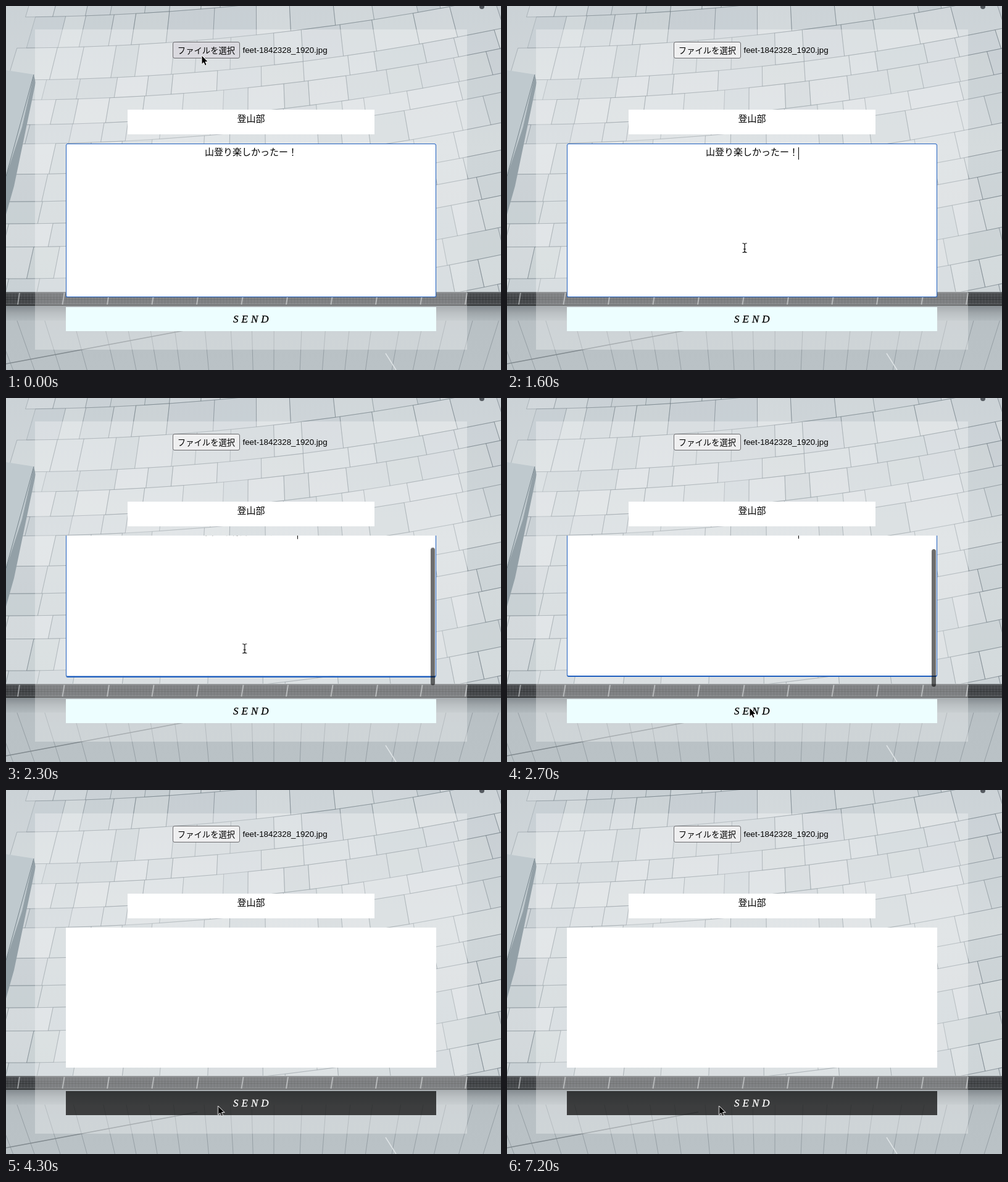
An HTML page with a canvas that plays this animation: 802 by 590 pixels, repeating every 7.3 s.

```html
<!DOCTYPE html>
<html lang="ja">
<head>
<meta charset="utf-8">
<title>Post form</title>
<style>
  html, body { margin: 0; width: 100%; height: 100%; overflow: hidden; }
  body { position: relative; color: #000; font: 15px/22px "Noto Sans CJK JP", "Noto Sans CJK", sans-serif; }
  body *, body *::before { box-sizing: border-box; }
  .abs, #stage > * { position: absolute; white-space: nowrap; }
  #stage { position: absolute; inset: 0; width: 802px; height: 590px; overflow: hidden; background: #cbd2d6; }
  .anim { animation: 7.3s linear infinite; }

  .panel { left: 47px; top: 38px; width: 700px; height: 519px; background: rgba(255, 255, 255, .3); }
  .file { left: 270px; top: 58px; width: 109px; height: 27px; border: 1px solid #6b6b6e; border-radius: 3px;
    background: #efeff0; font-size: 13.333px; line-height: 25px; text-align: center; animation-name: file; }
  .name { left: 383.5px; top: 61px; font: 13.333px/21px "Liberation Sans", Arial, sans-serif; }
  .title { left: 197px; top: 168px; width: 400px; height: 40px; background: #fff; line-height: 27px; text-align: center; }

  .view { left: 97px; top: 223px; width: 600px; height: 249px; overflow: hidden; }
  .page { left: 0; top: 0; width: 600px; height: 250px; animation-name: scroll; }
  .paper { inset: 0 0 2px; background: #fff; }
  .ring { inset: 0; border: 1px solid #1f5fbf; border-bottom-width: 2px; border-radius: 3px; animation-name: ring; }
  .text { left: 0; top: 2px; width: 100%; text-align: center; }
  .caret { left: 375px; top: 6px; width: 1px; height: 20px; background: #000; animation-name: caret; }
  .thumb { left: 591px; top: 2px; width: 7px; height: 223px; border-radius: 4px; background: #000; opacity: 0; animation-name: thumb; }

  .send { left: 97px; top: 488px; width: 600px; height: 39px; animation-name: send; }
  .send span { left: 271px; top: 0; font: italic 17px/39px "Liberation Serif", "Times New Roman", serif; letter-spacing: 5px; -webkit-text-stroke: .3px; }

  .cursor { left: 0; top: 0; width: 0; height: 0; animation-name: move; }
  .cursor svg { position: absolute; overflow: visible; width: 1px; height: 1px; }
  .arrow { animation-name: arrow; }
  .beam { animation-name: beam; }
  .arrow, .beam, .caret, .ring, .file { animation-timing-function: step-end; }

  @keyframes file { 0% { background: #dad9df; } 9.5%, 100% { background: #efeff0; } }
  @keyframes scroll {
    0%, 26.4% { transform: translateY(0); }
    27.4% { transform: translateY(-3px); animation-timing-function: ease-out; }
    32.2%, 100% { transform: translateY(-21px); }
  }
  @keyframes ring { 0% { opacity: 1; } 54.8%, 100% { opacity: 0; } }
  @keyframes caret {
    0%, 10.96%, 24.66%, 38.36%, 52.05%, 100% { opacity: 0; }
    4.11%, 17.81%, 31.51%, 45.1% { opacity: 1; }
  }
  @keyframes thumb {
    0%, 27.5% { opacity: 0; transform: translateY(3px); }
    28.3% { opacity: .57; transform: translateY(6px); }
    32.2%, 43.9% { opacity: .57; transform: translateY(20px); }
    45.2% { opacity: .4; transform: translateY(20px); }
    48%, 100% { opacity: 0; transform: translateY(20px); }
  }
  @keyframes send {
    0%, 37% { background: #edfeff; color: #000; animation-timing-function: ease; }
    47%, 100% { background: rgba(0, 0, 0, .71); color: #fff; }
  }
  @keyframes move {
    0%, 8.2% { transform: translate(317px, 80px); animation-timing-function: ease-in; }
    13.7% { transform: translate(331px, 171px); animation-timing-function: ease-out; }
    21.9% { transform: translate(385px, 392px); }
    27.4%, 30.1% { transform: translate(386px, 397px); animation-timing-function: ease-in-out; }
    37% { transform: translate(393px, 502px); animation-timing-function: ease-out; }
    45.2%, 47.9% { transform: translate(396px, 513px); animation-timing-function: ease-in-out; }
    53.4%, 100% { transform: translate(343.5px, 512px); }
  }
  @keyframes arrow { 0%, 34%, 100% { opacity: 1; } 13.5% { opacity: 0; } }
  @keyframes beam { 0%, 34%, 100% { opacity: 0; } 13.5% { opacity: 1; } }
</style>
</head>
<body>
<div id="stage">
  <canvas id="floor" width="802" height="590"></canvas>
  <div class="panel"></div>
  <div class="file anim">ファイルを選択</div>
  <div class="name">feet-1842328_1920.jpg</div>
  <div class="title">登山部</div>
  <div class="view">
    <div class="abs page anim">
      <div class="abs paper"></div>
      <div class="abs ring anim"></div>
      <div class="abs text">山登り楽しかったー！</div>
      <div class="abs caret anim"></div>
    </div>
    <div class="abs thumb anim"></div>
  </div>
  <div class="send anim"><span class="abs">SEND</span></div>
  <div class="cursor anim">
    <svg class="arrow anim"><path d="M0 0V14.6L3.3 11.6L5.5 16.6L8.2 15.4L6 10.6H10.6Z" fill="#000" stroke="#fff"/></svg>
    <svg class="beam anim" fill="none">
      <path id="bar" d="M-3.5 -7.5Q0 -7.5 0 -5.5Q0 -7.5 3.5 -7.5M0 -5.5V5.5M-3.5 7.5Q0 7.5 0 5.5Q0 7.5 3.5 7.5M-2 2H2" stroke="#fff" stroke-width="3"/>
      <use href="#bar" style="display:none"/>
      <path d="M-3.5 -7.5Q0 -7.5 0 -5.5Q0 -7.5 3.5 -7.5M0 -5.5V5.5M-3.5 7.5Q0 7.5 0 5.5Q0 7.5 3.5 7.5M-2 2H2" stroke="#000" stroke-width="1.2"/>
    </svg>
  </div>
</div>
<script>
  const c = document.getElementById('floor').getContext('2d');
  let seed = 11;
  const rand = () => (seed = (seed * 16807) % 2147483647) / 2147483647;

  function poly(points, fill) {
    c.beginPath();
    points.forEach(([x, y]) => c.lineTo(x, y));
    c.closePath();
    c.fillStyle = fill;
    c.fill();
  }
  function band(y0, y1, ...colors) {
    const g = c.createLinearGradient(0, y0, 0, y1);
    colors.forEach((color, i) => g.addColorStop(i / (colors.length - 1), color));
    c.fillStyle = g;
    c.fillRect(0, y0, 802, y1 - y0);
  }
  function line(x0, y0, x1, y1, color, width = 1) {
    c.beginPath();
    c.moveTo(x0, y0);
    c.lineTo(x1, y1);
    c.strokeStyle = color;
    c.lineWidth = width;
    c.stroke();
  }

  // Paving: columns fan out from a point far above, courses climb to the right.
  const place = (u, v) => {
    const x = 400 + (u - 400) * (v + 1200) / 1660;
    return [x, v - x * x * 0.00013];
  };
  band(0, 464, '#cbd2d6', '#d2d8db', '#cdd4d7');
  c.lineWidth = 0.8;
  for (let v = -10, h; v < 560; v += h) {
    h = 28 + rand() * 24;
    for (let u = -120 + rand() * 40, w; u < 960; u += w) {
      w = 42 + rand() * 58;
      const slab = [place(u, v), place(u + w, v), place(u + w, v + h), place(u, v + h)];
      poly(slab, `rgba(${rand() < .5 ? '255,255,255' : '150,165,173'},${rand() * .13})`);
      c.strokeStyle = `rgba(95,108,116,${.25 + rand() * .35})`;
      c.stroke();
    }
  }

  // Ledge and the shade along its side
  poly([[0, 104], [45, 111], [26, 196], [0, 276]], '#bfc9ce');
  poly([[45, 111], [48, 124], [13, 292], [0, 338], [0, 276], [26, 196]], '#93a0a7');
  line(45, 111, 0, 276, '#76848c');
  c.fillStyle = '#555a60';
  c.beginPath();
  c.arc(771, 1, 4, 0, 7);
  c.fill();

  // Lower pavement
  band(464, 590, '#b4bbbf', '#b9c1c5', '#bac2c6');
  for (let x = -20; x < 830; x += 34 + rand() * 16) {
    const lean = (430 - x) * 0.07;
    line(x, 508, x + lean, 590, 'rgba(85,96,103,.45)', .8);
  }
  line(0, 580, 310, 522, '#80898e', 1.5);
  line(615, 563, 632, 590, '#dfe4e6', 1.5);
  band(486, 510, '#838a8f', '#a0a7ab', '#b2babe');

  // Drain grating
  band(464, 486, '#55585b', '#424548', '#55585b');
  for (let x = 0; x < 802; x += 5) line(x, 466, x, 483, 'rgba(150,154,157,.35)', .7);
  for (let y = 468; y < 483; y += 4) line(0, y, 802, y, 'rgba(20,22,24,.4)');
  for (let x = 22; x < 802; x += 72.5) line(x, 465, x - 3, 484, 'rgba(205,208,210,.6)', 2);
  line(0, 485, 802, 485, '#2c2f31', 1.5);
  line(0, 463.5, 802, 463.5, '#9aa0a3');
</script>
</body>
</html>
```
